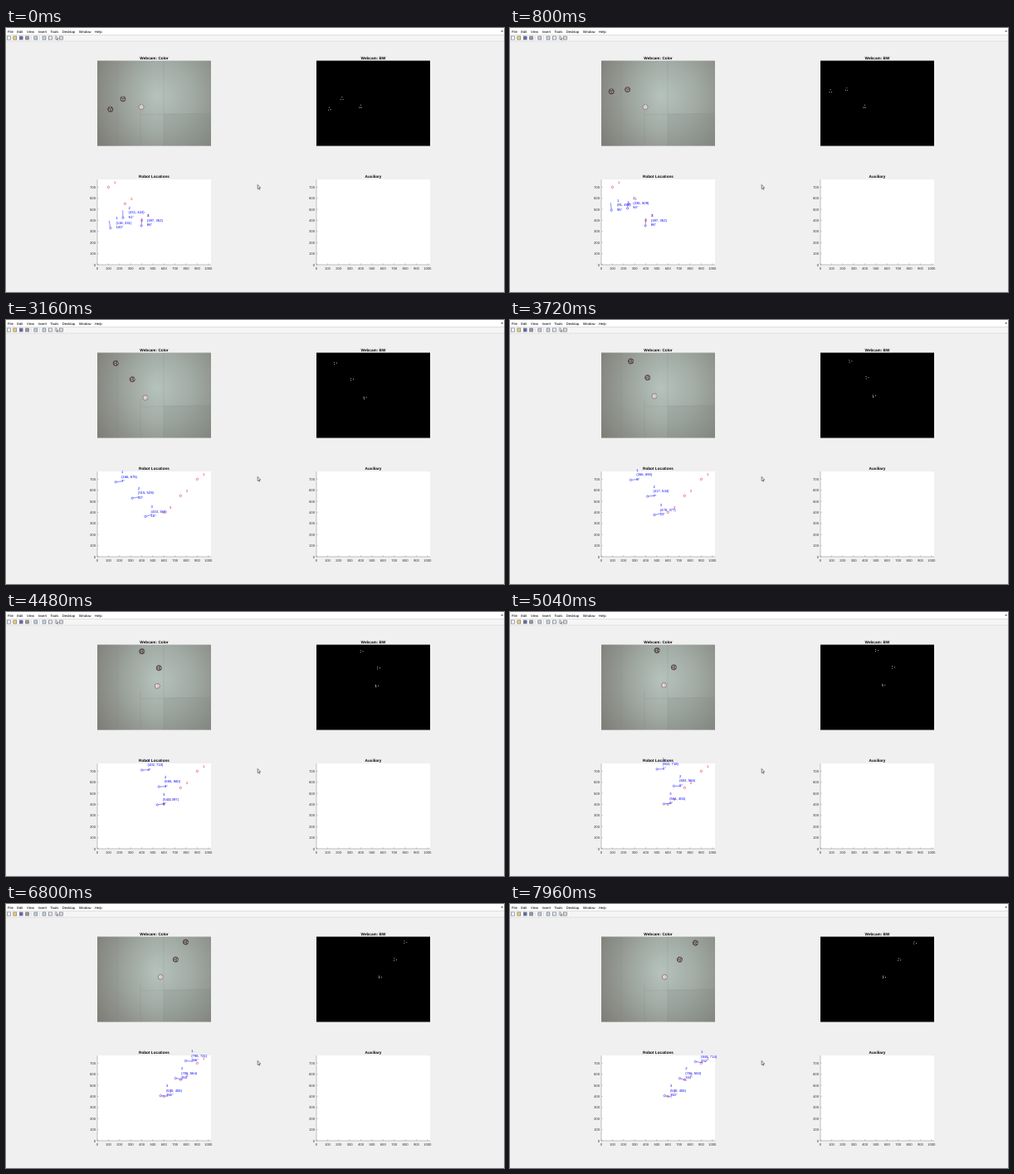
Recreate the animation shown at these times as an HTML page. Size 600 px wide and 319 px high, loop 8000 ms.

```html
<!DOCTYPE html>
<html lang="en">
<head>
<meta charset="utf-8">
<title>Robot tracking</title>
<style>
html, body { margin: 0; width: 100%; height: 100%; overflow: hidden; background: #f0f0f0; }
svg { display: block; width: 100vw; height: 100vh; }
text { font: 4.2px "Liberation Sans", Arial, sans-serif; text-rendering: geometricPrecision; white-space: pre; }
.title { font-size: 4.7px; font-weight: bold; text-anchor: middle; }
.tick { fill: #333; }
.blue text { fill: #00f; }
.red text { fill: #e8102c; }
.blue circle, .blue line { fill: none; stroke: #00f; stroke-width: .45; }
.red circle { fill: none; stroke: #e8102c; stroke-width: .5; }
</style>
</head>
<body>
<svg viewBox="0 0 600 319" preserveAspectRatio="none">
  <defs>
    <radialGradient id="floor" gradientUnits="userSpaceOnUse" cx="182" cy="82" r="90">
      <stop offset="0" stop-color="#b5c3bc"/>
      <stop offset=".45" stop-color="#a3aca6"/>
      <stop offset="1" stop-color="#858780"/>
    </radialGradient>
    <linearGradient id="shade">
      <stop offset="0" stop-color="#6f6562" stop-opacity=".25"/>
      <stop offset=".5" stop-color="#6f6562" stop-opacity="0"/>
    </linearGradient>
    <clipPath id="camClip"><rect x="110" y="39.5" width="137" height="103"/></clipPath>
    <clipPath id="bwClip"><rect x="374" y="39.5" width="137" height="103"/></clipPath>
  </defs>

  <rect width="600" height="319" fill="#f0f0f0"/>
  <rect width="600" height="8" fill="#fff"/>
  <rect y="8" width="600" height="8" fill="#f5f5f5"/>
  <path d="M0 8.5h600M0 16h600" stroke="#d6d6d6" stroke-width=".7"/>
  <g id="menu"></g>
  <path d="M596.4 3.3h2.6l-1.3 1.6z" fill="#333"/>
  <g id="tools" stroke-width=".6"></g>
  <path d="M60 9.5v4.3l1.1-.9.8 1.8.7-.3-.8-1.7h1.4z" fill="#fff" stroke="#222" stroke-width=".45"/>

  <g clip-path="url(#camClip)">
    <rect x="110" y="39" width="137" height="104" fill="url(#floor)"/>
    <rect x="110" y="39" width="137" height="104" fill="url(#shade)"/>
    <rect x="190" y="103.5" width="57" height="39" fill="#6f7a75" opacity=".16"/>
    <path d="M190 39v104M162 95v48M162 105l85-2M134 39v104" fill="none" stroke="#6f7a75" stroke-width=".6" opacity=".25"/>
    <g id="cam"></g>
  </g>
  <rect x="374" y="39.5" width="137" height="103"/>
  <g id="bw" clip-path="url(#bwClip)"></g>

  <g id="axes"></g>
  <g id="goals" class="red"></g>
  <g id="marks" class="blue"></g>
  <path d="M303.2 189.4v5l1.1-1 .8 1.8.8-.4-.8-1.7h1.6z" fill="#fff" stroke="#111" stroke-width=".5"/>
</svg>
<script>
const LOOP = 8000, SWITCH = 2720, REFRESH = 88;
const SCALE = 0.1338, LEFT = 110, RIGHT = 374, CAM_Y = 142.5, PLOT_Y = 286;
const $ = id => document.getElementById(id);

function set(el, attrs) {
  for (const k in attrs) el.setAttribute(k, attrs[k]);
}
function add(parent, tag, attrs = {}, text) {
  const el = document.createElementNS("http://www.w3.org/2000/svg", tag);
  set(el, attrs);
  if (text !== undefined) el.textContent = text;
  parent.appendChild(el);
  return el;
}

// menu and toolbar: even gaps between labels and between icons
let menuX = 2;
for (const name of ["File", "Edit", "View", "Insert", "Tools", "Desktop", "Window", "Help"]) {
  const label = add($("menu"), "text", { x: menuX, y: 5.7 }, name);
  menuX += label.getComputedTextLength() + 4.5;
}
["#fff", "#f3d772", "#6469b0", "#999", null, "#c3d6e6", null, "#c7dde5", "#e8eef0", null, null, "#ddd"]
  .reduce((x, fill) => {
    if (fill) add($("tools"), "rect", { x, y: 10, width: 3.8, height: 4, fill, stroke: "#667" });
    else add($("tools"), "path", { d: `M${x - 1} 9.5v5`, stroke: "#ccc" });
    return x + (fill ? 7.4 : 2.8);
  }, 1.5);

function drawAxes(x0) {
  const g = $("axes"), y0 = PLOT_Y;
  add(g, "rect", { x: x0, y: 183, width: 137, height: 103, fill: "#fff" });
  let d = `M${x0} 183V${y0}H${x0 + 137}`;
  for (let v = 0; v <= 1000; v += 100) {
    const x = x0 + v * SCALE, y = y0 - v * SCALE;
    d += `M${x} ${y0}v-1.4`;
    add(g, "text", { x, y: 291.7, class: "tick", "text-anchor": "middle" }, v);
    if (v > 700) continue;
    d += `M${x0} ${y}h1.4`;
    add(g, "text", { x: x0 - 2, y: y + 1.5, class: "tick", "text-anchor": "end" }, v);
  }
  add(g, "path", { d, fill: "none", stroke: "#666", "stroke-width": 0.4 });
}
[[LEFT, "Webcam: Color", "Robot Locations"], [RIGHT, "Webcam: BW", "Auxiliary"]]
  .forEach(([x0, top, bottom]) => {
    drawAxes(x0);
    add($("axes"), "text", { x: x0 + 68.5, y: 37.7, class: "title" }, top);
    add($("axes"), "text", { x: x0 + 68.5, y: 181, class: "title" }, bottom);
  });

// each robot drives two legs through three stops; bow bends a leg to its left
const robots = [
  { stops: [[118, 331], [89, 646], [860, 706]], time: [1527, 4300], bow: [12, 40],
    turn: [100, 86, 8, -8], fill: "#6b6060", rim: "#483b3b" },
  { stops: [[231, 424], [236, 509], [706, 563]], time: [500, 2580], bow: [0, 15],
    turn: [91, 72, 12, -16], fill: "#776b6b", rim: "#4f4142" },
  { stops: [[397, 352], [397, 352], [570, 406]], time: [500, 2130], bow: [0, 0],
    turn: [86, 86, 18, -10], fill: "#cdc6c5", rim: "#92777a" }
];
const goals = [
  i => [100 + 150 * i, 700 - 150 * i],
  i => [900 - 150 * i, 700 - 150 * i]
];

// the display freezes now and then
const stalls = [[200, 520], [1560, 1840], [2360, 2720], [3720, 4040],
  [5040, 5400], [5440, 5840], [6800, 7000], [7200, 7600]];

function shownTime(t) {
  let from = 0;
  for (const [stop, resume] of stalls) {
    if (t < stop) break;
    if (t < resume) return stop;
    from = resume;
  }
  return from + Math.floor((t - from) / REFRESH) * REFRESH;
}

const mix = (a, b, p) => a + (b - a) * p;
const clamp = p => Math.min(1, Math.max(0, p));
// steady speed, then a soft stop
const glide = (u, k = 0.84) => u < k ? u : 1 - (1 - k) * Math.exp((k - u) / (1 - k));

function pose(r, t) {
  const leg = t < SWITCH ? 0 : 1, since = t - leg * SWITCH;
  const [[ax, ay], [bx, by]] = r.stops.slice(leg);
  const p = glide(since / r.time[leg]);
  const len = Math.hypot(bx - ax, by - ay) || 1;
  const bend = r.bow[leg] * Math.sqrt(Math.sin(Math.PI * p)) / len;
  const [h0, h1, h2, h3] = r.turn;
  const deg = leg
    ? mix(h1, mix(h2, h3, since / (LOOP - SWITCH)), clamp(since / 400))
    : mix(h0, h1, clamp(since / 2160));
  return [mix(ax, bx, p) - (by - ay) * bend, mix(ay, by, p) + (bx - ax) * bend, deg];
}

function addLights(g, n) {
  const dot = (cx, cy) => add(g, "circle", { cx, cy, r: 0.5, fill: "#fff" });
  dot(2.3, 0);
  for (let i = 0; i < n; i++) dot(-0.6, -1.2 + 2.4 * i / (n - 1));
}

robots.forEach((r, i) => {
  r.cam = add($("cam"), "g");
  r.bw = add($("bw"), "g");
  add(r.cam, "circle", { r: 3.1, fill: r.fill, stroke: r.rim, "stroke-width": 0.8 });
  for (const g of [r.cam, r.bw]) addLights(g, i < 2 ? 2 : 3);
  r.mark = add($("marks"), "g");
  add(r.mark, "circle", { r: 1.2 });
  r.line = add(r.mark, "line");
  [, r.pos, r.angle] = [-10.5, -4.9, 0.5].map(y => add(r.mark, "text", { x: 6.7, y }, i + 1));
  r.goal = add($("goals"), "g");
  add(r.goal, "circle", { r: 1.2 });
  add(r.goal, "text", { x: 6.7, y: -4.8 }, i + 1);
});

const place = (x0, y0, x, y) => `translate(${x0 + x * SCALE} ${y0 - y * SCALE})`;

function draw(t) {
  const now = shownTime(t), goal = goals[now < SWITCH ? 0 : 1];
  robots.forEach((r, i) => {
    const [x, y, deg] = pose(r, now), rad = deg * Math.PI / 180;
    const c = Math.cos(rad), s = -Math.sin(rad), turn = ` rotate(${-deg})`;
    set(r.cam, { transform: place(LEFT, CAM_Y, x, y) + turn });
    set(r.bw, { transform: place(RIGHT, CAM_Y, x, y) + turn });
    set(r.mark, { transform: place(LEFT, PLOT_Y, x, y) });
    set(r.line, { x1: 1.2 * c, y1: 1.2 * s, x2: 9 * c, y2: 9 * s });
    r.pos.textContent = `(${Math.round(x)}, ${Math.round(y)})`;
    r.angle.textContent = `${(Math.round(deg) + 360) % 360}°`;
    set(r.goal, { transform: place(LEFT, PLOT_Y, ...goal(i)) });
  });
}

const start = performance.now();
function frame() {
  draw((performance.now() - start) % LOOP);
  requestAnimationFrame(frame);
}
frame();
</script>
</body>
</html>
```
